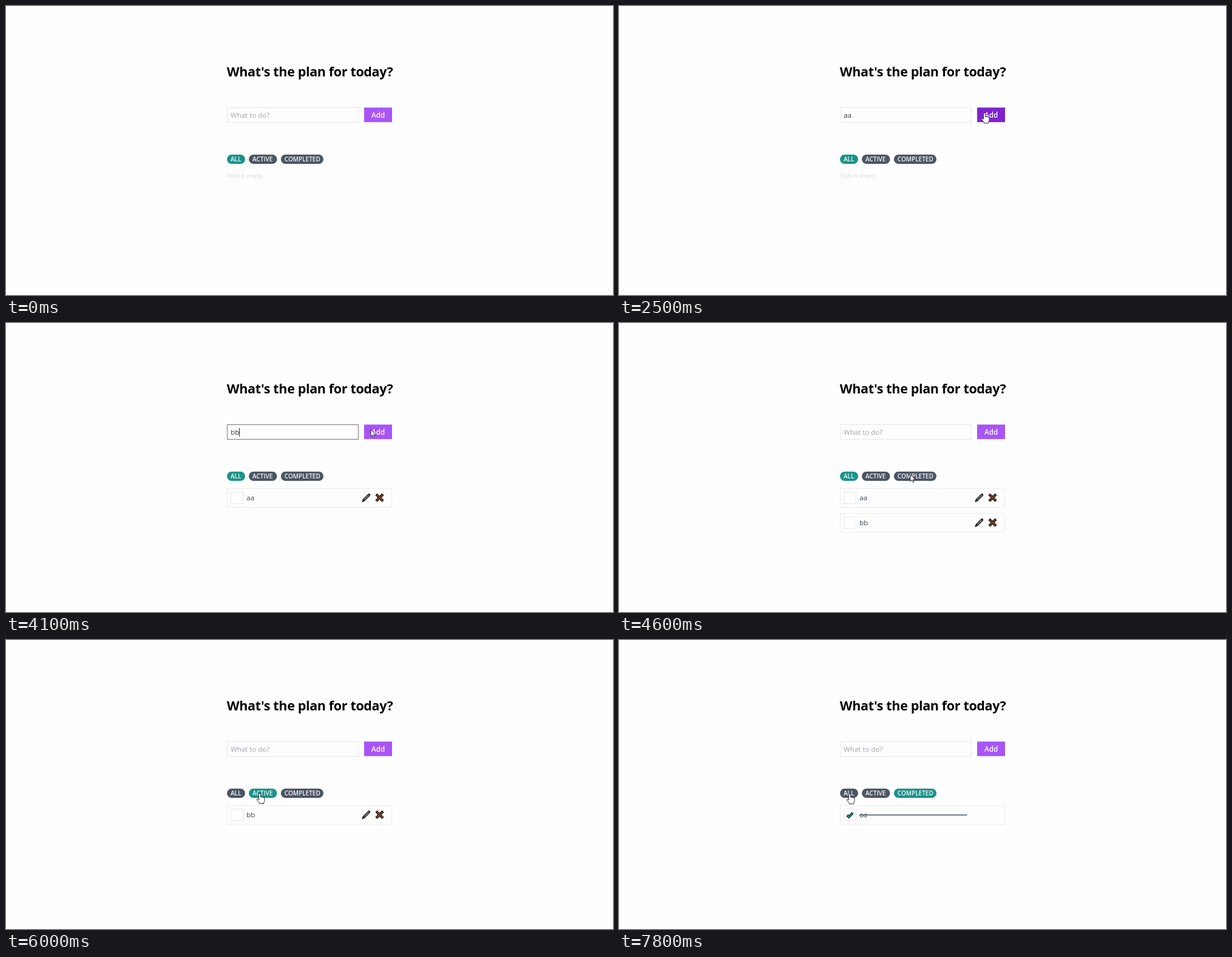
Write an HTML page with a canvas that moves like this. It is 1000 px wide and 476 px high and loops after 8000 ms.

```html
<!DOCTYPE html>
<html lang="en">
<head>
<meta charset="utf-8">
<title>Todo</title>
<style>
  html, body { margin: 0; width: 100%; height: 100%; overflow: hidden; background: #fefefe; }
  canvas { display: block; width: 1000px; height: 476px; }
</style>
</head>
<body>
<canvas id="stage"></canvas>
<script>
const W = 1000, H = 476, LOOP = 8000;
const canvas = document.getElementById('stage');
const ctx = canvas.getContext('2d');
const dpr = window.devicePixelRatio || 1;
canvas.width = W * dpr;
canvas.height = H * dpr;

const FAMILY = '"Open Sans", "Noto Sans", sans-serif';
const TEAL = '#1a938a', SLATE = '#4b5563', LINE = '#e5e7eb';

// Each track holds its last value until the next entry.
const at = (track, t) => {
  let value = track[0][1];
  for (const [time, v] of track) if (t >= time) value = v;
  return value;
};

const entry = [[0, ''], [1900, 'a'], [2100, 'aa'], [2600, ''], [3500, 'b'], [3700, 'bb'], [4400, '']];
const focus = [[0, false], [1500, true], [2500, false], [3000, true], [4300, false]];
const button = [[0, '#a855f7'], [2500, '#7e22ce'], [2700, '#a855f7'], [4200, '#7e22ce'], [4500, '#a855f7']];
const tab = [[0, 0], [6000, 1], [6800, 2]];
const boxHover = [[0, false], [5100, true], [5500, false]];
const pointer = [
  [0, null],
  [1500, ['beam', 555, 180]], [1900, null],
  [2200, ['arrow', 583, 178]], [2500, ['hand', 602, 176]],
  [2700, ['beam', 520, 180]], [3500, null],
  [4100, ['arrow', 601, 176]], [4200, ['hand', 602, 176]],
  [4500, ['arrow', 560, 215]], [4600, ['arrow', 480, 250]], [4700, ['arrow', 420, 280]],
  [5000, ['arrow', 405, 290]], [5100, ['hand', 389, 291]], [5200, ['hand', 384.5, 289.5]],
  [5500, ['arrow', 398, 272]], [5600, ['hand', 418, 252.5]],
  [6300, ['arrow', 449, 254]], [6400, ['hand', 465, 252]], [6500, ['hand', 482, 252.5]],
  [6900, ['hand', 455, 250]], [7000, ['hand', 407, 244]],
  [7100, ['arrow', 396, 250]], [7200, ['hand', 380, 253]]
];

const cursors = {
  hand: new Path2D('M-1.5 1.5Q-1.5 0 0 0Q1.5 0 1.5 1.5V6.2Q3 5.2 4 6.6Q5.5 5.8 6.2 7.2Q8 6.8 8 8.8V11.5Q8 13.5 6.7 15V17H-.8V15.5Q-3 13 -4.8 10.6Q-4.8 8.6 -3 9.2L-1.5 10.6Z'),
  arrow: new Path2D('M0 0V11L2.6 8.6L4.3 12.4L6 11.6L4.4 8H7.8Z'),
  beam: new Path2D('M-2.5 -6H2.5M0 -6V6M-2.5 6H2.5')
};

function text(str, x, y, size, color, style = '') {
  ctx.font = `${style} ${size}px ${FAMILY}`;
  ctx.fillStyle = color;
  ctx.fillText(str, x, y);
}

function box(x, y, w, h, stroke, fill) {
  if (fill) {
    ctx.fillStyle = fill;
    ctx.fillRect(x, y, w, h);
  }
  ctx.strokeStyle = stroke;
  ctx.lineWidth = 1;
  ctx.strokeRect(x + 0.5, y + 0.5, w - 1, h - 1);
}

function line(points, color, width, cap = 'butt') {
  ctx.beginPath();
  points.forEach(([x, y]) => ctx.lineTo(x, y));
  ctx.strokeStyle = color;
  ctx.lineWidth = width;
  ctx.lineCap = cap;
  ctx.stroke();
}

function pill(label, x, w, active) {
  ctx.beginPath();
  ctx.roundRect(x, 244.8, w, 15.2, 7.6);
  ctx.fillStyle = active ? TEAL : SLATE;
  ctx.fill();
  text(label, x + 6, 256, 10, '#f4f6f8', '600');
}

function pencil(x, y) {
  line([[x - 4.2, y + 4.2], [x + 4.6, y - 4.6]], '#2b2b2b', 4.4, 'round');
  line([[x - 6.3, y + 6.3], [x - 3, y + 3]], '#2b2b2b', 2, 'round');
  line([[x - 3.2, y + 3.2], [x + 4.3, y - 4.3]], '#77777a', 2);
}

function cross(x, y) {
  for (const [color, width, r] of [['#1f1510', 4.4, 4], ['#7a4224', 2.2, 4]]) {
    line([[x - r, y - r], [x + r, y + r]], color, width, 'square');
    line([[x + r, y - r], [x - r, y + r]], color, width, 'square');
  }
}

function check(x, y) {
  const points = [[x - 4.6, y + 0.6], [x - 1.6, y + 3.4], [x + 4.8, y - 3.2]];
  line(points, '#14211f', 4.2);
  line(points, '#149a83', 2);
}

function row(y, label, done, hover) {
  box(364, y, 272, 32, '#ececef');
  box(370, y + 6, 21, 20, LINE, hover ? LINE : null);
  text(label, 396.3, y + 20, 11.5, '#374151');
  if (done) {
    check(380.3, y + 16);
    line([[396, y + 16.2], [573.5, y + 16.2]], '#475563', 1.5);
  } else {
    pencil(593.5, y + 15.7);
    cross(615.5, y + 15.7);
  }
}

function drawInput(t) {
  const value = at(entry, t), active = at(focus, t);
  box(364, 167, 217, 25, active ? '#77777c' : LINE);
  if (value) text(value, 370.3, 184, 11.5, '#333438');
  else text('What to do?', 370, 184, 11.5, '#9ca3af');
  if (active) {
    ctx.font = `11.5px ${FAMILY}`;
    const x = 370.3 + ctx.measureText(value).width;
    line([[x, 173], [x, 187]], '#222', 1);
  }
}

function drawList(t) {
  const done = t >= 5400, view = at(tab, t);
  const todos = [];
  if (t >= 2600) todos.push(['aa', done]);
  if (t >= 4400) todos.push(['bb', false]);
  const shown = todos.filter(([, d]) => view === 0 || d === (view === 2));
  shown.forEach(([label, d], i) => row(272 + i * 41, label, d, i === 0 && at(boxHover, t)));
  if (!shown.length) text('Todo is empty', 364, 283, 9.7, '#d1d5db', 'italic');
}

function drawPointer(t) {
  const p = at(pointer, t);
  if (!p) return;
  const [kind, x, y] = p;
  ctx.save();
  ctx.translate(x, y);
  ctx.lineWidth = 1;
  ctx.lineJoin = 'round';
  ctx.strokeStyle = '#30303a';
  if (kind !== 'beam') {
    ctx.fillStyle = '#fff';
    ctx.fill(cursors[kind]);
  }
  ctx.stroke(cursors[kind]);
  ctx.restore();
}

function draw(t) {
  ctx.setTransform(dpr, 0, 0, dpr, 0, 0);
  ctx.fillStyle = '#fefefe';
  ctx.fillRect(0, 0, W, H);

  ctx.letterSpacing = '-0.35px';
  text("What's the plan for today?", 363.8, 115.6, 21.5, '#050505', '700');
  ctx.letterSpacing = '0px';

  drawInput(t);
  ctx.fillStyle = at(button, t);
  ctx.fillRect(590, 167.3, 46, 24);
  text('Add', 602, 184, 11.6, '#fff', '600');

  const view = at(tab, t);
  pill('ALL', 364, 30, view === 0);
  pill('ACTIVE', 400, 46.5, view === 1);
  pill('COMPLETED', 452.8, 70.2, view === 2);

  drawList(t);
  drawPointer(t);
}

const start = performance.now();
function tick() {
  draw((performance.now() - start) % LOOP);
  requestAnimationFrame(tick);
}
tick();
</script>
</body>
</html>
```
